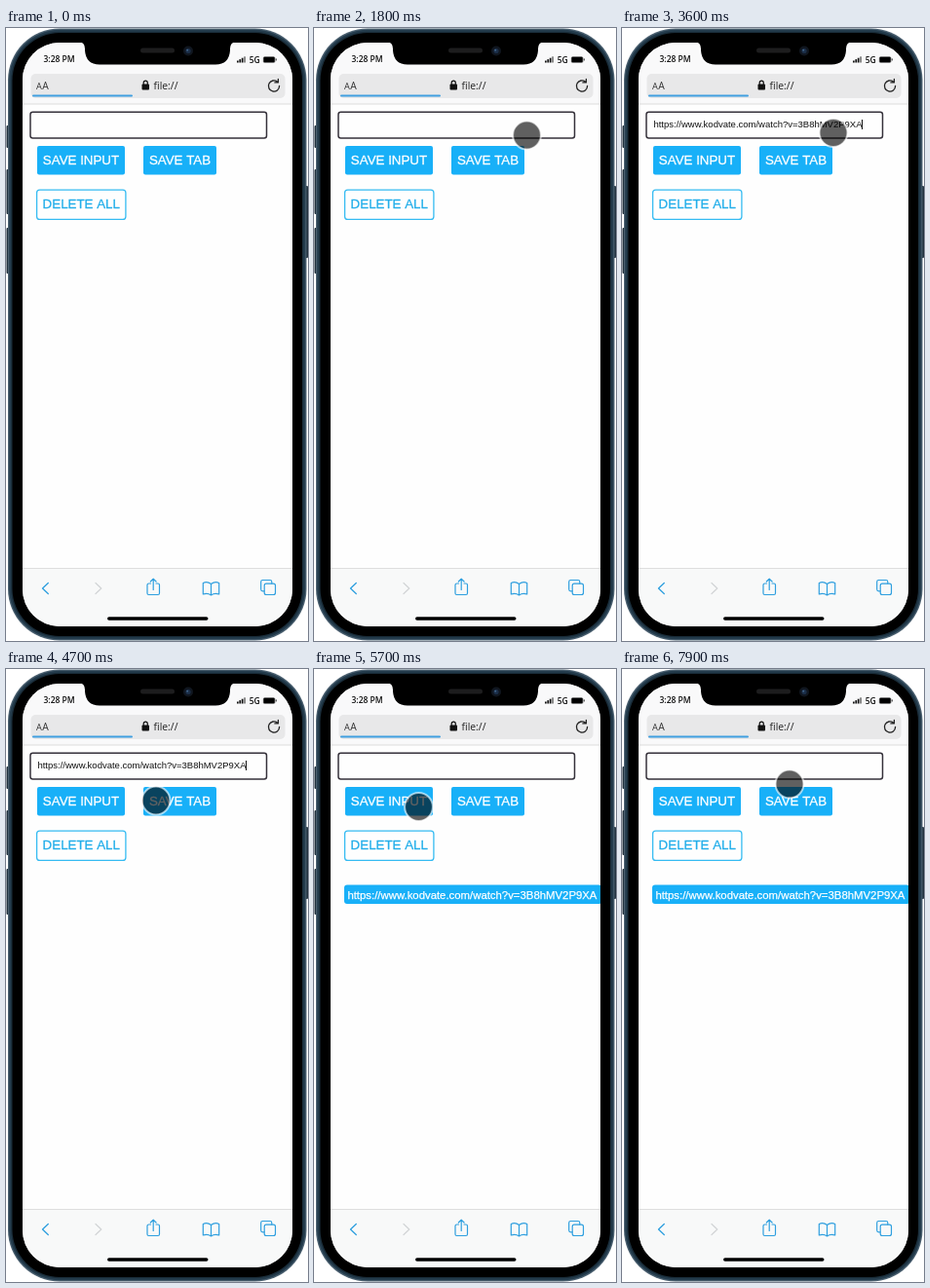
Animation, 310 px wide and 629 px high, one loop 8 s. Source, as an HTML page with a canvas:

```html
<!DOCTYPE html>
<html lang="en">
<head>
<meta charset="utf-8">
<title>Link saver on a phone</title>
<style>
  html, body { margin: 0; width: 100%; height: 100%; overflow: hidden; background: #fff; }
  canvas { display: block; width: 310px; height: 629px; }
</style>
</head>
<body>
<canvas id="stage" width="310" height="629"></canvas>
<script>
const ctx = document.getElementById('stage').getContext('2d');
const LOOP = 8000;
const STEP = 100;
const LINK = 'https://www.kodvate.com/watch?v=3B8hMV2P9XA';
const BLUE = '#18b0f8';
const ICON_BLUE = '#2e9fdf';
const SANS = '"Liberation Sans", Arial, sans-serif';
const UI = '"Open Sans", "Noto Sans", sans-serif';

// Pointer path: time, x, y
const pointerPath = [
  [1200, 288, 182], [1400, 262, 150], [1600, 233, 121], [1800, 218.5, 110],
  [2000, 217, 107.5], [4400, 217, 107.5], [4500, 214, 109.5], [4600, 214, 109.5],
  [4700, 154, 135], [4800, 128, 140], [4900, 113, 142], [5000, 107.5, 141.5],
  [7400, 107.5, 141.5], [7500, 112, 139], [7700, 141, 129], [7900, 172, 118]
];

const within = (t, from, to) => t >= from && t < to;

function roundPath(x, y, w, h, r) {
  ctx.beginPath();
  ctx.roundRect(x, y, w, h, r);
}

function fillRound(x, y, w, h, r, color) {
  roundPath(x, y, w, h, r);
  ctx.fillStyle = color;
  ctx.fill();
}

function strokeRound(x, y, w, h, r, color, width) {
  roundPath(x, y, w, h, r);
  ctx.strokeStyle = color;
  ctx.lineWidth = width;
  ctx.stroke();
}

function strokeIcon(d, color, width = 1.2) {
  ctx.strokeStyle = color;
  ctx.lineWidth = width;
  ctx.lineCap = ctx.lineJoin = 'round';
  ctx.stroke(new Path2D(d));
}

function disc(x, y, r, color) {
  ctx.beginPath();
  ctx.arc(x, y, r, 0, Math.PI * 2);
  ctx.fillStyle = color;
  ctx.fill();
}

function label(text, x, y, font, color, { align = 'left', weight = 0 } = {}) {
  ctx.font = font;
  ctx.fillStyle = ctx.strokeStyle = color;
  ctx.textAlign = align;
  ctx.fillText(text, x, y);
  if (weight) {
    ctx.lineWidth = weight;
    ctx.strokeText(text, x, y);
  }
}

function drawBody() {
  for (const [y, h] of [[100, 23], [145, 46], [205, 47]]) fillRound(0.5, y, 4, h, 1, '#20313e');
  fillRound(306, 162, 4, 74, 1, '#20313e');
  fillRound(2, 0.5, 306.5, 628, 53, '#4b6070');
  fillRound(3.2, 1.7, 304.1, 625.6, 52, '#243c4d');
  fillRound(5.2, 3.7, 300.1, 621.6, 50, '#1a2d3a');
  fillRound(6.5, 5, 297.5, 619, 49, '#000');
}

function drawNotch() {
  ctx.fillStyle = '#000';
  ctx.fill(new Path2D('M75 14 Q81 15 81 21 V23 Q82 37.5 96 37.5 H215 Q229 37.5 230 23 V21 Q230 15 236 14 Z'));
  fillRound(138, 20.5, 35, 5, 2.5, '#1d1d1e');
  disc(187, 23.5, 5, '#10161f');
  disc(187, 23.5, 2.6, '#1b2e48');
  disc(186.2, 22.8, 1, '#42668a');
}

function drawStatus() {
  label('3:28 PM', 38.5, 35.3, `600 8.5px ${UI}`, '#111');
  for (let i = 0; i < 4; i++) {
    const h = 2 + i * 1.4;
    ctx.fillStyle = i < 3 ? '#111' : '#777';
    ctx.fillRect(237 + i * 2.4, 35.5 - h, 1.7, h);
  }
  label('5G', 249.7, 35.7, `600 8.5px ${UI}`, '#111');
  fillRound(263.8, 29.2, 12.6, 6.6, 1.6, '#8a8a8a');
  fillRound(264.5, 29.8, 11.2, 5.4, 1, '#000');
  fillRound(276.7, 31.2, 1, 2.4, 0.5, '#222');
}

function drawAddressBar() {
  ctx.fillStyle = '#f9f9fa';
  ctx.fillRect(17, 15, 277, 63);
  ctx.fillStyle = '#dedede';
  ctx.fillRect(17, 77.5, 277, 1);
  fillRound(25.5, 47, 261, 25, 5, '#e8e8e9');
  fillRound(27, 68.5, 103, 2, 1, '#409fe0');
  label('A', 31, 63, `9.2px ${UI}`, '#333');
  label('A', 37.2, 63, `10.3px ${UI}`, '#333');
  fillRound(139.5, 57.5, 7.5, 6, 1, '#111');
  strokeIcon('M141.2 58 V56.3 A2.05 2.2 0 0 1 145.3 56.3 V58', '#111', 1.2);
  label('file://', 151.5, 63, `10.4px ${UI}`, '#222');
  strokeIcon('M278.6 55.2 A5.6 5.6 0 1 0 280.6 59.5 M279.4 52.4 V55.9 H275.9', '#222', 1.3);
}

function drawToolbar() {
  ctx.fillStyle = '#f8f9f9';
  ctx.fillRect(17, 555, 277, 60);
  ctx.fillStyle = '#dedede';
  ctx.fillRect(17, 554, 277, 1);
  strokeIcon('M43.3 569.5 L37.5 575 L43.3 580.5', ICON_BLUE, 1.3);
  strokeIcon('M92 569.5 L97.8 575 L92 580.5', '#d3d5d7', 1.3);
  strokeIcon('M148.5 570 H146.5 Q145 570 145 571.5 V580 Q145 581.5 146.5 581.5 H156 Q157.5 581.5 157.5 580 V571.5 Q157.5 570 156 570 H154 M151.2 576.5 V565.5 M148.3 568 L151.2 565.2 L154.1 568', ICON_BLUE);
  strokeIcon('M210.5 570.5 Q206.5 567.5 202.3 569.5 V581 Q207 579.5 210.5 582 Q214 579.5 218.7 581 V569.5 Q214.5 567.5 210.5 570.5 V582', ICON_BLUE);
  strokeRound(265.2, 570.2, 11.3, 11.3, 2, ICON_BLUE, 1.2);
  strokeIcon('M265 577.8 H263.5 Q261.7 577.8 261.7 576 V568.3 Q261.7 566.5 263.5 566.5 H271 Q272.8 566.5 272.8 568.3 V570', ICON_BLUE);
  fillRound(104, 604.2, 103.5, 3.6, 1.8, '#000');
}

function drawButton(text, x, y, w, h, scale = 1, outlined = false) {
  ctx.save();
  ctx.translate(x + w / 2, y + h / 2);
  ctx.scale(scale, scale);
  if (outlined) strokeRound(-w / 2 + 0.6, -h / 2 + 0.6, w - 1.2, h - 1.2, 3, '#35bbf2', 1.3);
  else fillRound(-w / 2, -h / 2, w, h, 2, BLUE);
  label(text, 0, 3.9, `13.33px ${SANS}`, outlined ? '#22aeea' : '#fff', { align: 'center', weight: 0.3 });
  ctx.restore();
}

function drawPage(t) {
  const filled = within(t, 3600, 5700);
  const caret = within(t, 2300, 2800) || within(t, 3400, 4200) || within(t, 4700, 5200);
  strokeRound(25, 86.2, 242.5, 26.8, 2.5, '#35313a', 1.5);
  if (filled) label(LINK, 32.4, 102.2, `9.5px ${SANS}`, '#111');
  if (caret) {
    ctx.fillStyle = '#111';
    ctx.fillRect(filled ? 246 : 33, 94, 1, 10);
  }
  drawButton('SAVE INPUT', 32, 121, 90, 29.5, within(t, 5400, 5700) ? 0.95 : 1);
  drawButton('SAVE TAB', 141, 121, 75, 29.5);
  drawButton('DELETE ALL', 31, 165.5, 92.5, 31.5, 1, true);
  if (t >= 5700) {
    fillRound(31, 221.5, 264, 19.5, 3, BLUE);
    label(LINK, 34.4, 235.5, `11.37px ${SANS}`, '#fff', { weight: 0.25 });
  }
}

function drawPointer(t) {
  if (t < pointerPath[0][0]) return;
  const next = pointerPath.findIndex(p => p[0] > t);
  const b = pointerPath[next < 0 ? pointerPath.length - 1 : next];
  const a = next < 0 ? b : pointerPath[next - 1];
  const k = a === b ? 0 : (t - a[0]) / (b[0] - a[0]);
  const x = a[1] + (b[1] - a[1]) * k;
  const y = a[2] + (b[2] - a[2]) * k;
  disc(x, y, 14.2, 'rgba(0,0,0,0.62)');
  ctx.beginPath();
  ctx.arc(x, y, 14.4, 0, Math.PI * 2);
  ctx.strokeStyle = 'rgba(255,255,255,0.6)';
  ctx.lineWidth = 2;
  ctx.stroke();
}

function draw(now) {
  const t = Math.floor((now % LOOP) / STEP) * STEP;
  ctx.fillStyle = '#fff';
  ctx.fillRect(0, 0, 310, 629);
  drawBody();
  ctx.save();
  roundPath(17, 15, 277, 599, 38);
  ctx.clip();
  ctx.fillStyle = '#fefefe';
  ctx.fillRect(17, 15, 277, 600);
  drawAddressBar();
  drawStatus();
  drawPage(t);
  drawToolbar();
  drawPointer(t);
  ctx.restore();
  drawNotch();
  requestAnimationFrame(draw);
}

requestAnimationFrame(draw);
</script>
</body>
</html>
```
